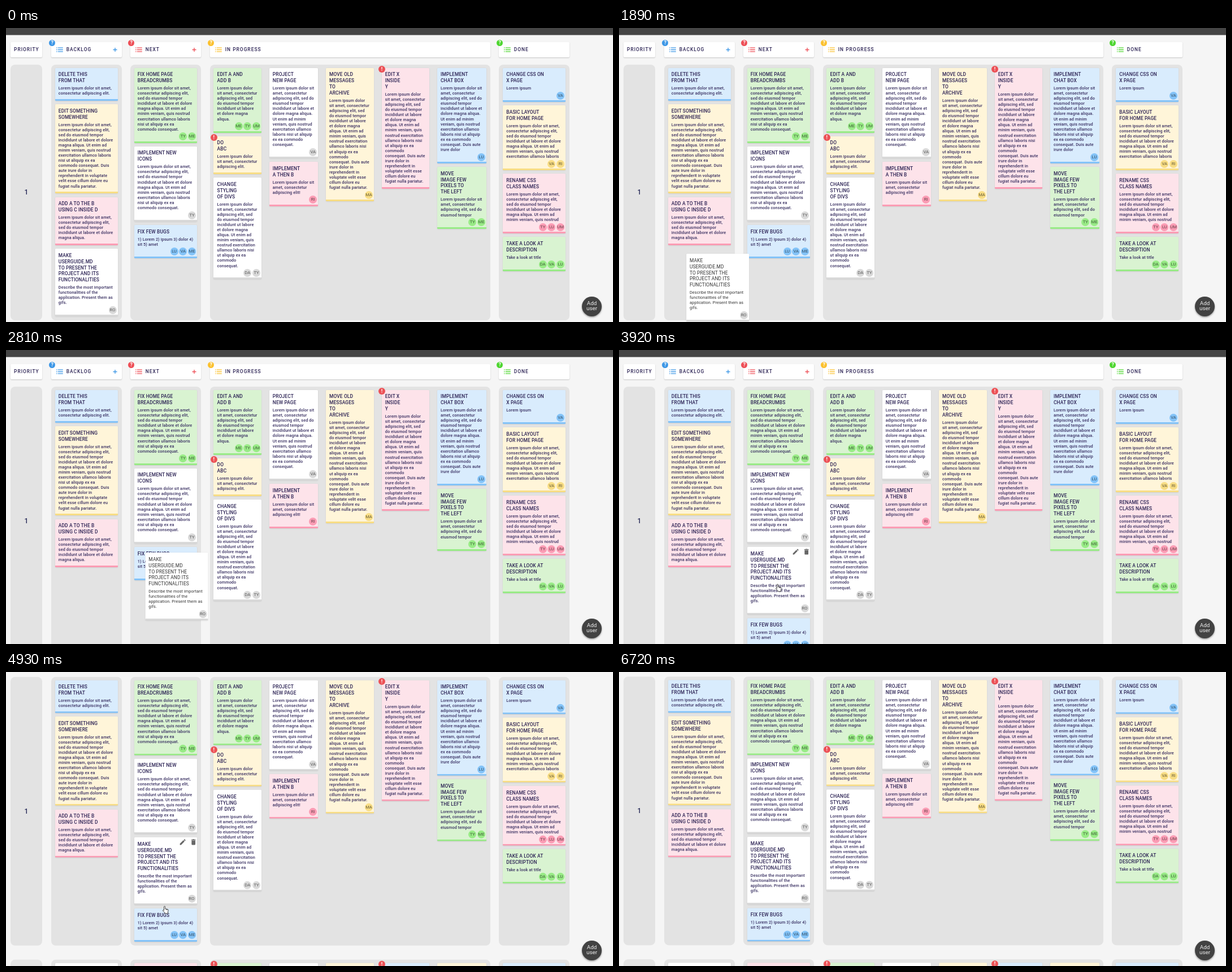
Animation of 1074 by 521 pixels, one loop 7.35 s. Source, as an HTML page:

```html
<!DOCTYPE html>
<html lang="en">
<head>
<meta charset="utf-8">
<title>Task board</title>
<style>
html, body { margin: 0; width: 100%; height: 100%; overflow: hidden; background: #f5f5f5; }
body { position: relative; font-family: Roboto, sans-serif; color: #2a2153; }
#page, .lane, .stack, .head, .help, .badge, #bar, #lower, #add, #cursor, .tools, .people, .head > * { position: absolute; }
#page { inset: 0; }
#bar { left: 0; top: 0; width: 1074px; height: 12px; background: #454545; border-bottom: 1px solid #9d9d9d; }
#lower { left: 0; }
.lane { background: #e3e3e3; border-radius: 8px; display: flex; align-items: center; justify-content: center; font: 500 12px Roboto, sans-serif; color: #262a58; }
.head { top: 25px; height: 27px; background: #fff; border-radius: 2px; box-shadow: 0 1px 2px #0003; font: 500 8.39px/27px Roboto, sans-serif; letter-spacing: 1.03px; white-space: nowrap; }
.help, .badge { width: 11px; height: 11px; border-radius: 50%; color: #fff; text-align: center; font: 700 9px/11.5px Roboto, sans-serif; }
.help { top: 20.7px; }
.badge { left: -5.5px; top: -4px; width: 12px; height: 12px; line-height: 12.5px; background: #ec5156; }
.stack { top: 70.7px; }
.card { position: relative; box-sizing: border-box; margin-bottom: 6.2px; padding: 6.6px 0 5.76px 6.3px; border-bottom: 3px solid var(--dark); border-radius: 1.5px; background: var(--light); box-shadow: 0 .5px 2px #0002; white-space: pre; }
.card.staffed { padding-bottom: 16.91px; }
.title { font: 500 8.39px/10.85px Roboto, sans-serif; letter-spacing: .13px; }
.text { margin-top: 3.13px; font: 500 7.27px/9.08px Roboto, sans-serif; letter-spacing: .11px; color: #372e60; }
.people { right: 2px; bottom: 1.4px; display: flex; gap: 1.7px; }
.people i { width: 14px; height: 14px; border-radius: 50%; background: var(--dark); font: 400 7.6px/14.5px Roboto, sans-serif; text-align: center; color: #0009; }
.tools { left: 79.8px; top: 1.6px; display: none; }
.tools svg { position: absolute; width: 13.4px; fill: #666; }
.dragged { z-index: 2; }
.dragged .title, .dragged .text { font-weight: 400; color: #333; }
#add { left: 1019px; top: 475.5px; width: 35px; height: 35px; box-sizing: border-box; padding-top: 8.5px; border-radius: 50%; background: #424242; color: #eee; box-shadow: 0 1.5px 3px #0006; font: 400 9.8px/8.8px Roboto, sans-serif; text-align: center; }
#cursor { left: 0; top: 0; width: 12px; height: 14px; overflow: visible; }
</style>
</head>
<body>
<div id="page">
  <div id="bar"></div>
  <div id="lower"></div>
</div>
<div id="add">Add<br>user</div>
<svg id="cursor" stroke="#333" stroke-width=".9" stroke-linejoin="round" fill="#fff">
  <circle id="press" cx="1" cy="3" r="6.5" fill="#f8e71c" fill-opacity=".7" stroke="none"/>
  <path id="arrow" d="M0 0V10L2.3 8 3.9 11.4 5.5 10.7 4 7.4H7Z"/>
  <path id="hand" transform="translate(-3.5)" d="M2.5 7.6V1.2a1.1 1.1 0 0 1 2.2 0V4.6L9 5.5q1.3.3 1.1 1.8L9.4 11v2H4.2V11.6L.6 8.4Q0 7.2 .9 6.8T2.5 7.6ZM6.4 5v1.8M8.2 5.4v1.6"/>
</svg>
<script>
const LOOP = 7350, LANE_TOP = 64.5, PRESS = [125, 447], SLOT = [140, -42.2], SHIFT = 126.2, SCROLL = 56.8;
const $ = id => document.getElementById(id);
const page = $('page'), lower = $('lower');
const lorem = ('Lorem ipsum dolor sit amet, consectetur adipiscing elit, sed do eiusmod tempor incididunt ut labore ' +
  'et dolore magna aliqua. Ut enim ad minim veniam, quis nostrud exercitation ullamco laboris nisi ut aliquip ' +
  'ex ea commodo consequat. Duis aute irure dolor in reprehenderit in voluptate velit esse cillum dolore eu ' +
  'fugiat nulla pariatur.').split(' ');
const palette = {
  w: ['#fff', '#d9d9d9'], b: ['#d9ecfd', '#83c3f8'], g: ['#d9f3d1', '#98eb86'],
  y: ['#fff5d9', '#f8dd84'], p: ['#fde3ea', '#fb9cb4']
};
const lanes = [
  [8, 56, 'PRIORITY'], [80, 125, 'BACKLOG', '#3d97e6', true], [220, 125, 'NEXT', '#ee4f57', true],
  [361, 496, 'IN PROGRESS', '#fbc12f'], [872, 125, 'DONE', '#4dd62f']
];
// Card: colour | title | text, or words of lorem per line | people | mark
const stacks = [
  [86.5, 111, 'w', [
    'b|DELETE THIS/FROM THAT|Lorem ipsum dolor sit amet,/consectetur adipiscing elit.',
    'y|EDIT SOMETHING/SOMEWHERE|5345543534353',
    'p|ADD A TO THE B/USING C INSIDE D|53452',
    'w|MAKE/USERGUIDE.MD/TO PRESENT THE/PROJECT AND ITS/FUNCTIONALITIES|Describe the most important/functionalities of the/application. Present them as/gifs.|RO']],
  [226.5, 111.5, 'p', [
    'g|FIX HOME PAGE/BREADCRUMBS|534554352|TY ME',
    'w|IMPLEMENT NEW/ICONS|534554352|TY',
    'b|FIX FEW BUGS|1) Lorem 2) ipsum 3) dolor 4)/sit 5) amet|LU VA ME']],
  [367.3, 84.7, 'g!', [
    'g|EDIT A AND/ADD B|3333331|ME TY UM',
    'y|DO/ABC|Lorem ipsum dolor/sit amet, consectetur/adipiscing elit.||!',
    'w|CHANGE/STYLING/OF DIVS|3333334323411|DA TY']],
  [465.5, 86.7, 'w', [
    'w|PROJECT/NEW PAGE|424243432431|VA',
    'p|IMPLEMENT/A THEN B|Lorem ipsum dolor sit/amet, consectetur/adipiscing elit!|RI']],
  [565.7, 85.3, 'y', ['y|MOVE OLD/MESSAGES/TO/ARCHIVE|333333432341332333|MA']],
  [664.5, 84.7, 'b!', ['p|EDIT X/INSIDE/Y|333333432341332333||!']],
  [762.7, 87.3, 'y', [
    'b|IMPLEMENT/CHAT BOX|4242434324332|LU',
    'g|MOVE/IMAGE FEW/PIXELS TO/THE LEFT|4242|TY ME']],
  [879, 111, 'b', [
    'b|CHANGE CSS ON/X PAGE|Lorem ipsum|VA',
    'y|BASIC LAYOUT/FOR HOME PAGE|5345543|VA RI',
    'p|RENAME CSS/CLASS NAMES|534554|TY LU UM',
    'g|TAKE A LOOK AT/DESCRIPTION|Take a look at title|DA VA LU']]
];
// Pointer tip: time, x, y
const path = [
  [750, 334, 521], [1410, ...PRESS], [1540, ...PRESS], [1890, 157, 456], [2270, 230, 444], [2810, 284.5, 415],
  [2960, 281, 405], [3130, 281, 405], [3190, 280.5, 415], [5500, 280.5, 415], [5580, 284, 408], [5740, 284, 408],
  [6450, 903, 461], [6730, 1036, 524]
];

function add(parent, cls, html = '', style = '') {
  const el = document.createElement('div');
  el.className = cls;
  el.innerHTML = html;
  el.style.cssText = style;
  parent.append(el);
  return el;
}

const lines = text => text.replaceAll('/', '\n');
function body(text) {
  if (!/^\d+$/.test(text)) return lines(text);
  let at = 0;
  return [...text].map(n => lorem.slice(at, at += +n).join(' ')).join('\n');
}
const tint = c => `--light:${palette[c][0]};--dark:${palette[c][1]};`;
const badge = '<div class="badge">!</div>';

function addCard(parent, spec) {
  const [color, title, text, people, mark] = spec.split('|');
  const faces = people ? `<div class="people">${people.split(' ').map(p => `<i>${p}</i>`).join('')}</div>` : '';
  return add(parent, people ? 'card staffed' : 'card',
    `<div class="title">${lines(title)}</div><div class="text">${body(text)}</div>${faces}${mark ? badge : ''}`, tint(color));
}

const upperLanes = lanes.map(([x, w, name, color, plus]) => {
  const box = `left:${x}px;width:${w}px;`;
  const lane = add(page, 'lane', color ? '' : '1', box + `top:${LANE_TOP}px`);
  add(lower, 'lane', '', box + 'height:300px');
  const head = add(page, 'head', '', box);
  add(head, '', name, `left:${color ? 26.7 : 6}px`);
  if (color) {
    const bullets = '<path d="M0 1.2h1.5M0 4.5h1.5M0 7.8h1.5M2.8 1.2h9M2.8 4.5h9M2.8 7.8h9"/>';
    const cross = plus ? '<path d="M100.5 4.5h7M104 1v7"/>' : '';
    head.innerHTML += `<svg style="left:9px;top:9px;overflow:visible" width="12" height="9" stroke="${color}" stroke-width="1.3">${bullets}${cross}</svg>`;
    add(page, 'help', '?', `left:${x - 3.8}px;background:${color}`);
  }
  return lane;
});

const cards = stacks.map(([x, w, next, list]) => {
  const box = `left:${x}px;width:${w}px;`;
  const preview = add(lower, 'stack', '', box + 'top:6.2px');
  add(preview, 'card', next[1] ? badge : '', tint(next[0]) + 'height:80px');
  const stack = add(page, 'stack', '', box);
  return list.map(spec => addCard(stack, spec));
});
const guide = cards[0][3], bugs = cards[1][2];
const icon = (x, d) => `<svg viewBox="0 0 24 24" style="left:${x}px"><path d="${d}"/></svg>`;
const tools = add(guide, 'tools',
  icon(0, 'M3 17.25V21h3.75L17.81 9.94l-3.75-3.75zM20.71 7.04a1 1 0 0 0 0-1.41l-2.34-2.34a1 1 0 0 0-1.41 0l-1.83 1.83 3.75 3.75z') +
  icon(18.4, 'M6 19c0 1.1.9 2 2 2h8c1.1 0 2-.9 2-2V7H6zM19 4h-3.5l-1-1h-5l-1 1H5v2h14z'));

const progress = (t, from, to) => Math.min(1, Math.max(0, (t - from) / (to - from)));
const smooth = p => p * p * (3 - 2 * p);
const within = (t, from, to) => t >= from && t < to;
const show = (el, on) => el.style.display = on ? 'block' : 'none';
const move = (el, x, y) => el.style.transform = x || y ? `translate(${x}px,${y}px)` : 'none';

// Hermite curve through the points, at rest wherever the pointer pauses
function slope(i, k) {
  const a = path[i - 1], b = path[i], c = path[i + 1];
  if (!a || !c || a[k] === b[k] || b[k] === c[k]) return 0;
  return (c[k] - a[k]) / (c[0] - a[0]);
}
function pointer(t) {
  let i = path.findIndex(p => p[0] > t) - 1;
  if (i === -2) i = path.length - 2;
  i = Math.max(i, 0);
  const a = path[i], b = path[i + 1], d = b[0] - a[0], p = progress(t, a[0], b[0]), s = smooth(p);
  return [1, 2].map(k => a[k] + (b[k] - a[k]) * s +
    d * (slope(i, k) * p * (1 - p) ** 2 - slope(i + 1, k) * p * p * (1 - p)));
}

function draw(t) {
  const [x, y] = pointer(t);
  const arriving = t < 1540 && x < 198, revisit = within(t, 5530, 5800);
  const hand = arriving || within(t, 1540, 5250) || revisit;

  move($('cursor'), x, y);
  show($('cursor'), within(t, 750, 6715));
  show($('hand'), hand);
  show($('arrow'), !hand);
  show($('press'), within(t, 1540, 3650));
  show(tools, arriving || within(t, 3905, 5250) || revisit);

  let offset = [0, 0];
  if (t >= 1540) {
    const drop = 1 - (1 - progress(t, 3650, 3905)) ** 3;
    offset = [x - PRESS[0], y - PRESS[1]];
    if (t >= 3650) offset = [280.5 - PRESS[0], 415 - PRESS[1]].map((v, k) => v + (SLOT[k] - v) * drop);
  }
  move(guide, ...offset);
  guide.classList.toggle('dragged', within(t, 1540, 3905));
  move(bugs, 0, SHIFT * smooth(progress(t, 2810, 2960)));

  const height = t < 2215 ? 453.5 : 476.5;
  for (const lane of upperLanes) lane.style.height = height + 'px';
  lower.style.top = LANE_TOP + height + 25 + 'px';
  move(page, 0, -SCROLL * smooth(progress(t, 4770, 4942)));
}

const start = performance.now();
function tick() {
  draw((performance.now() - start) % LOOP);
  requestAnimationFrame(tick);
}
tick();
</script>
</body>
</html>
```
